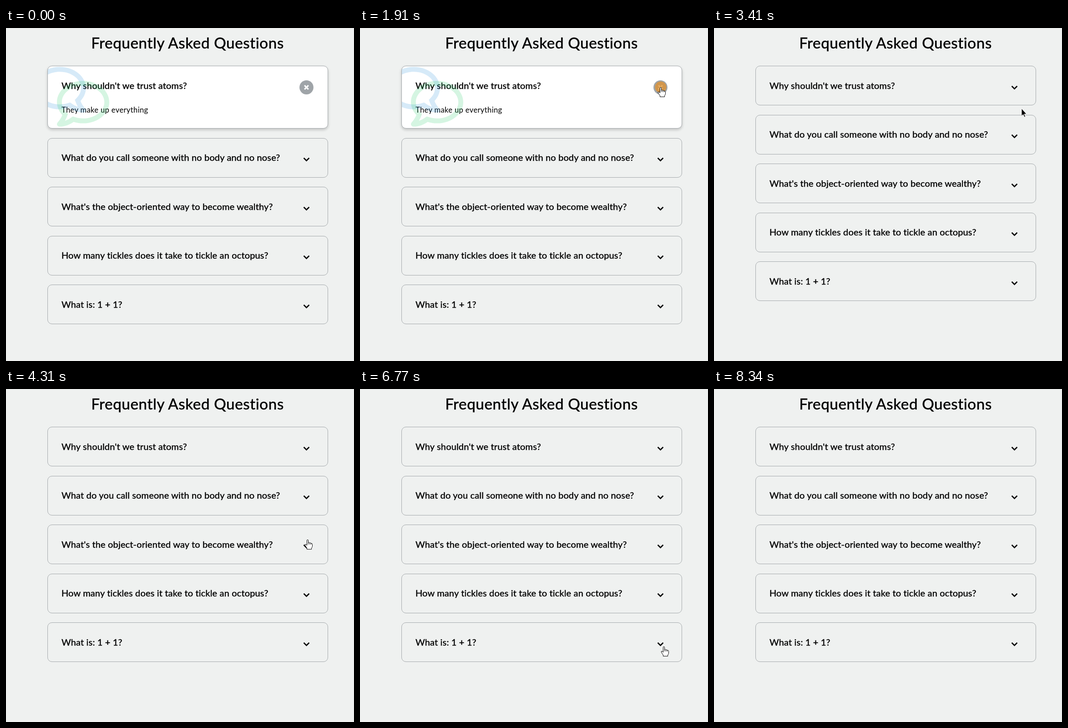
An HTML page that plays this animation: 765 by 732 pixels, repeating every 8710 ms.

```html
<!DOCTYPE html>
<html lang="en">
<head>
<meta charset="utf-8">
<title>Frequently Asked Questions</title>
<style>
  html, body { margin: 0; width: 100%; height: 100%; overflow: hidden; }
  body { position: relative; background: #eff1f0; box-sizing: border-box; }
  svg { position: absolute; left: 0; top: 0; overflow: visible; }
  text { font-family: Lato, sans-serif; fill: #000; }
  .edge { position: absolute; inset: 0; border: solid #e3e5e5; border-width: 1px 1px 0 0; }
  .heading { font-size: 33.2px; letter-spacing: .018em; stroke: #000; stroke-width: .5px; text-anchor: middle; }
  .question { font-size: 20px; letter-spacing: .0075em; stroke: #000; stroke-width: .4px; }
  .answer { font-size: 16.6px; letter-spacing: .02em; }
  .card {
    position: absolute; left: 91px; width: 617px; box-sizing: border-box;
    border: 1px solid #a4a9ac; border-radius: 10px; overflow: hidden;
  }
  .card svg { left: -1px; }
  .bubble { opacity: .2; }
</style>
</head>
<body>
<div class="edge"></div>
<svg width="765" height="732"><text class="heading" x="399" y="45">Frequently Asked Questions</text></svg>
<div id="cards"></div>
<svg id="pointer" width="1" height="1">
  <circle id="press" r="12.5" fill="rgba(225,145,45,.75)"/>
  <path id="arrow" d="M0 0V16.5L3.7 13L6.3 19L8.6 18L6.1 12.2H11.2Z" fill="#000" stroke="#fff"/>
  <g id="hand" fill="#fff" stroke="#000" stroke-linejoin="round">
    <path d="M-1.5 1.2Q0-.8 1.5 1.2V6.5Q3.7 5.5 4.5 7.3Q6.7 6.3 7.5 8.3Q10.3 7.6 10.5 10.5V14.5Q10.2 17 8.6 18.6V21.3H-1.5V18.8L-5.4 13Q-6.6 9.8-4 10.3L-1.5 12.7Z"/>
    <path d="M1.5 6.5V10.5M4.5 7.3V10.7M7.5 8.3V11" fill="none"/>
  </g>
</svg>
<script>
const LOOP = 8710, FADE = 300;
const BUTTON = { x: 569.5, y: 46.5, r: 15.4 };
const BUBBLE = 'M256 32C114.6 32 0 125.1 0 240c0 47.6 19.9 91.2 52.9 126.3C38 405.7 7 439.1 6.5 439.5c-6.6 7-8.4 17.2-4.6 26S14.4 480 24 480c61.5 0 110-25.7 139.1-46.3C192 442.8 223.2 448 256 448c141.4 0 256-93.1 256-208S397.4 32 256 32zm0 368c-26.7 0-53.1-4.1-78.4-12.1l-22.7-7.2-19.5 13.8c-14.3 10.1-33.9 21.4-57.5 29 7.3-12.1 14.4-25.7 19.9-40.2l10.6-28.1-20.6-21.8C69.7 314.1 48 282.2 48 240c0-88.2 93.3-160 208-160s208 71.8 208 160-93.3 160-208 160z';

// Times in ms; each card opens at most once per loop.
const faqs = [
  { q: "Why shouldn't we trust atoms?", a: 'They make up everything', open: -FADE, close: 2010 },
  { q: 'What do you call someone with no body and no nose?', a: 'Nobody knows.' },
  { q: "What's the object-oriented way to become wealthy?", a: 'Inheritance.', open: 4650, close: 5540 },
  { q: 'How many tickles does it take to tickle an octopus?', a: 'Ten-tickles!' },
  { q: 'What is: 1 + 1?', a: 'Depends on who are you asking.', open: 7000, close: 7720 },
];
const presses = [[1860, 2010], [4520, 4650], [5420, 5540], [6880, 7000], [7600, 7720]];
// Pointer path: time, x, y
const path = [
  [130, 741, 728], [480, 690, 540], [760, 615, 370], [980, 660, 285], [1080, 661, 286], [1280, 661, 286],
  [1780, 661, 130], [2150, 661, 130], [2600, 665, 148], [2780, 668, 174], [3090, 669, 136],
  [3550, 679, 195], [3930, 666, 246], [4310, 663, 331], [4450, 660, 344], [5600, 660, 344],
  [6290, 672, 530], [6770, 668, 566], [6870, 662, 560], [7790, 662, 560], [8340, 719, 733],
];

const $ = id => document.getElementById(id);
const show = (el, on) => { el.style.display = on ? '' : 'none'; };

for (const faq of faqs) {
  const card = document.createElement('div');
  card.className = 'card';
  card.innerHTML = `<svg width="617" height="138">
    <text class="question" x="31" y="50">${faq.q}</text>
    <g class="closed" transform="translate(${BUTTON.x} ${BUTTON.y})">
      <path d="M-5.9-2.8L0 3.1L5.9-2.8" fill="none" stroke="#000" stroke-width="2.7"/>
    </g>
    <g class="opened">
      <text class="answer" x="31" y="102">${faq.a}</text>
      <path class="bubble" d="${BUBBLE}" fill="#3498db" transform="translate(84.7 -5.8) scale(-.2246 .2246)"/>
      <path class="bubble" d="${BUBBLE}" fill="#2ecc71" transform="translate(21 25) scale(.2246)"/>
      <g transform="translate(${BUTTON.x} ${BUTTON.y})">
        <circle r="${BUTTON.r}" fill="#9fa4a8"/>
        <path d="M-4.3-4.3L4.3 4.3M4.3-4.3L-4.3 4.3" stroke="#fff" stroke-width="3.2"/>
      </g>
    </g></svg>`;
  $('cards').append(card);
  faq.card = card;
  faq.content = card.firstChild;
  faq.closedPart = card.querySelector('.closed');
  faq.openedPart = card.querySelector('.opened');
}

const ease = p => 1 - (1 - Math.min(1, Math.max(0, p))) ** 3;

function pointerAt(t) {
  const i = path.findIndex(([time]) => time > t);
  if (i < 1) return null;
  const [t0, x0, y0] = path[i - 1], [t1, x1, y1] = path[i];
  const p = (t - t0) / (t1 - t0);
  return { x: x0 + (x1 - x0) * p, y: y0 + (y1 - y0) * p };
}

function drawCards(t) {
  let shift = 0;
  faqs.forEach((faq, i) => {
    const isOpen = t >= faq.open && t < faq.close;
    const glow = 'open' in faq ? ease((t - faq.open) / FADE) - ease((t - faq.close) / FADE) : 0;
    const shadow = `0 3px 6px rgba(0,0,0,${glow * .1})`;
    const exactTop = 83.5 + 107.5 * i + shift;
    const boxTop = Math.floor(exactTop);
    faq.top = Math.round(exactTop);
    // The box snaps down to whole pixels, its content to the nearest one.
    faq.content.style.top = faq.top - boxTop - 1 + 'px';
    Object.assign(faq.card.style, {
      top: boxTop + 'px',
      height: (isOpen ? 138 : 87) + 'px',
      background: `rgba(255,255,255,${glow})`,
      boxShadow: `${shadow}, ${shadow}`,
    });
    show(faq.closedPart, !isOpen);
    show(faq.openedPart, isOpen);
    if (isOpen) shift += 51;
  });
}

function drawPointer(t) {
  const pos = pointerAt(t);
  show($('pointer'), pos);
  if (!pos) return;
  const x = Math.round(pos.x), y = Math.round(pos.y);
  const overButton = faqs.some(({ top }) =>
    Math.abs(x - 91 - BUTTON.x) < 16 && Math.abs(y - top - BUTTON.y) < 16);
  $('pointer').style.transform = `translate(${x}px, ${y}px)`;
  show($('hand'), overButton);
  show($('arrow'), !overButton);
  show($('press'), presses.some(([down, up]) => t >= down && t < up));
}

function frame(now) {
  const t = now % LOOP;
  drawCards(t);
  drawPointer(t);
  requestAnimationFrame(frame);
}
frame(performance.now());
</script>
</body>
</html>
```
